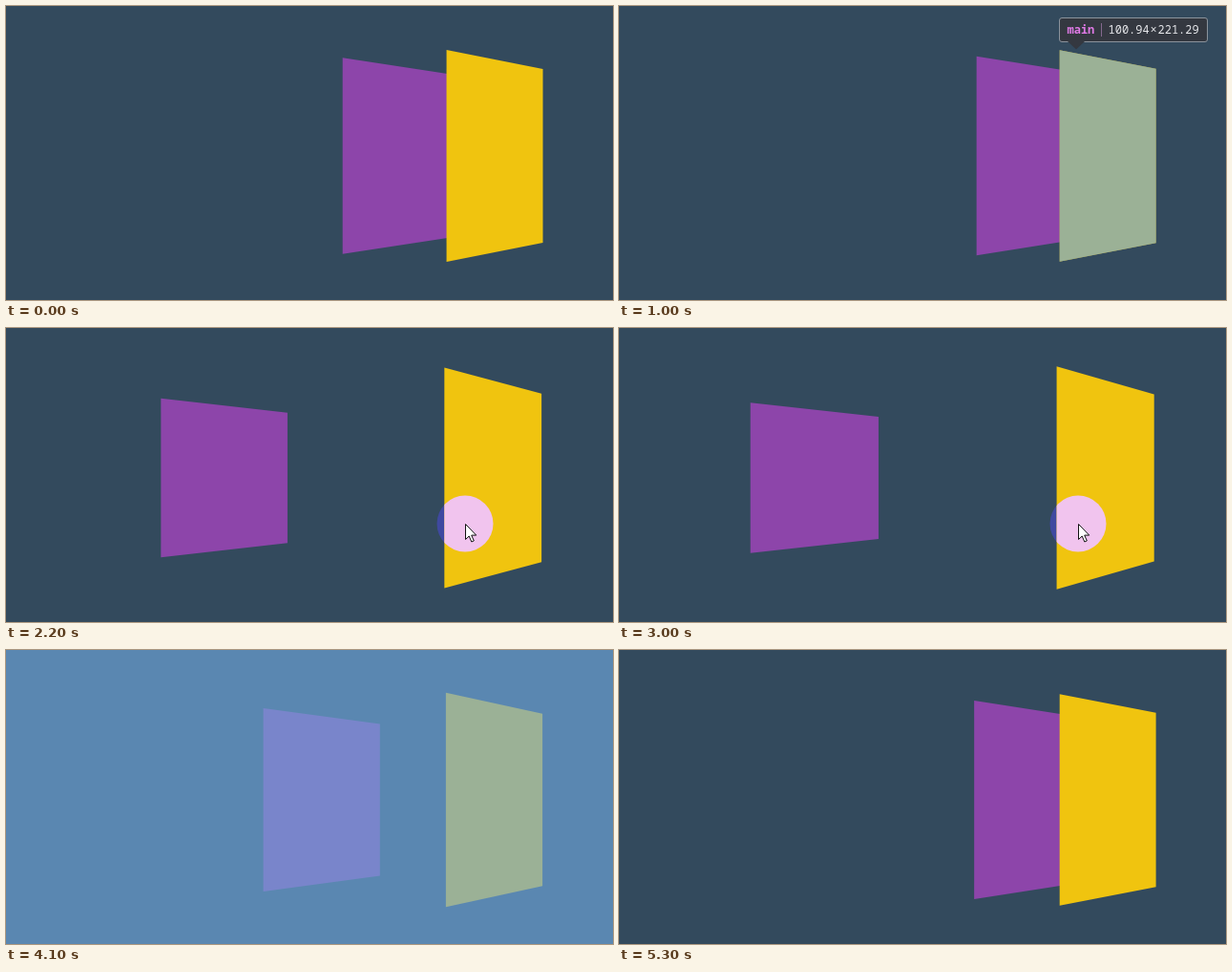
An HTML page with a canvas for the animation above (5400 ms loop, 636 px wide and 308 px high).

```html
<!DOCTYPE html>
<html lang="en">
<head>
<meta charset="utf-8">
<title>Perspective panels</title>
<style>
  html, body { margin: 0; width: 100%; height: 100%; overflow: hidden; background: #334a5d; }
  canvas, svg { position: absolute; left: 0; top: 0; width: 636px; height: 308px; }
  text { font: 12px "Noto Sans Mono", "DejaVu Sans Mono", monospace; fill: #e6e7ea; }
  .tag { font-weight: 600; fill: #e07ae6; }
</style>
</head>
<body>
<canvas id="stage" width="636" height="308"></canvas>
<svg id="tip" viewBox="0 0 636 308">
  <rect x="461.5" y="12.5" width="155" height="25" rx="2.5" fill="#343840" stroke="#8b939c"/>
  <path d="M470 37h18l-9 8.5z" fill="#343840"/>
  <text class="tag" x="469.5" y="29">main</text>
  <path d="M505.5 18v14" stroke="#85698f"/>
  <text x="512.5" y="29">100.94</text>
  <text x="556.5" y="29">×</text>
  <text x="564.5" y="29">221.29</text>
</svg>
<script>
const W = 636, H = 308, LOOP = 5400, STEP = 100;
const CX = 517, CY = 157, HALF = 100;
const SIN = Math.sin(Math.PI / 3), COS = 0.5;
const TINT = "rgba(111,168,220,.66)";
const ctx = document.getElementById("stage").getContext("2d");
const tip = document.getElementById("tip");

// Time and transition progress, before easing
const RISE = [[1130, 0], [3130, 1]];
const FALL = [[3348, 0], [4700, .68], [5000, .69], [5100, .752], [5300, .886], [5400, .95]];
const SETTLE = [[0, .682], [300, .86], [400, 1]];
// Time and pointer height
const POINTER = [[1200, 248], [1300, 214], [1400, 205], [3100, 205], [3200, 232], [3300, 284]];

function track(keys, t) {
  if (t <= keys[0][0]) return keys[0][1];
  for (let i = 1; i < keys.length; i++) {
    const [t0, v0] = keys[i - 1], [t1, v1] = keys[i];
    if (t <= t1) return v0 + (v1 - v0) * (t - t0) / (t1 - t0);
  }
  return keys[keys.length - 1][1];
}

// cubic-bezier(.25, .1, .25, 1)
function ease(x) {
  let lo = 0, hi = 1;
  for (let i = 0; i < 30; i++) {
    const s = (lo + hi) / 2;
    if (.75 * s * (1 - s) + s ** 3 < x) lo = s; else hi = s;
  }
  const r = 1 - lo;
  return .3 * lo * r * r + 3 * lo * lo * r + lo ** 3;
}

function hoverAmount(t) {
  if (t < 1000) return 1 - ease(track(SETTLE, t));
  if (t < 3348) return ease(track(RISE, t));
  return 1 - ease(track(FALL, t));
}

// perspective(depth) rotateY(60deg) translateZ(-back)
function panel(depth, back) {
  const path = new Path2D();
  for (const [u, v] of [[-1, -1], [1, -1], [1, 1], [-1, 1]]) {
    const x = u * HALF * COS - back * SIN;
    const z = -u * HALF * SIN - back * COS;
    const k = depth / (depth - z);
    path.lineTo(CX + x * k, CY + v * HALF * k);
  }
  path.closePath();
  return path;
}

function fill(path, color) {
  ctx.fillStyle = color;
  ctx.fill(path);
}

function draw(t) {
  const h = hoverAmount(t);
  const depth = 900 - 300 * h;
  const front = panel(depth, 0);
  const showTip = t >= 400 && t < 1100;
  const blue = (t >= 200 && t < 300) || (t >= 1100 && t < 1200) || (t >= 3500 && t < 4600);
  const pointer = t >= 1200 && t < 3400;
  const x = 481, y = track(POINTER, t);
  const halo = new Path2D();
  halo.arc(x, y, 29.5, 0, 2 * Math.PI);

  ctx.fillStyle = "#334a5d";
  ctx.fillRect(0, 0, W, H);
  fill(panel(depth, 100 + 400 * h), "#8d45aa");
  if (pointer) fill(halo, "#3f49a0");
  fill(front, "#f0c40f");

  if (pointer) {
    ctx.save();
    ctx.clip(front);
    fill(halo, "#f1c4ee");
    ctx.restore();
    const arrow = new Path2D("M.5 .5v16l3.7-3.5 2.6 6 2.5-1.1-2.6-5.8h5z");
    ctx.save();
    ctx.translate(x, y);
    fill(arrow, "#fff");
    ctx.strokeStyle = "#111";
    ctx.lineWidth = 1;
    ctx.stroke(arrow);
    ctx.restore();
  }
  if (showTip) fill(front, TINT);
  if (blue) {
    ctx.fillStyle = TINT;
    ctx.fillRect(0, 0, W, H);
  }
  tip.style.display = showTip ? "block" : "none";
}

const start = performance.now();
function tick() {
  const t = (performance.now() - start) % LOOP;
  draw(Math.floor(t / STEP) * STEP);
  requestAnimationFrame(tick);
}
tick();
</script>
</body>
</html>
```
